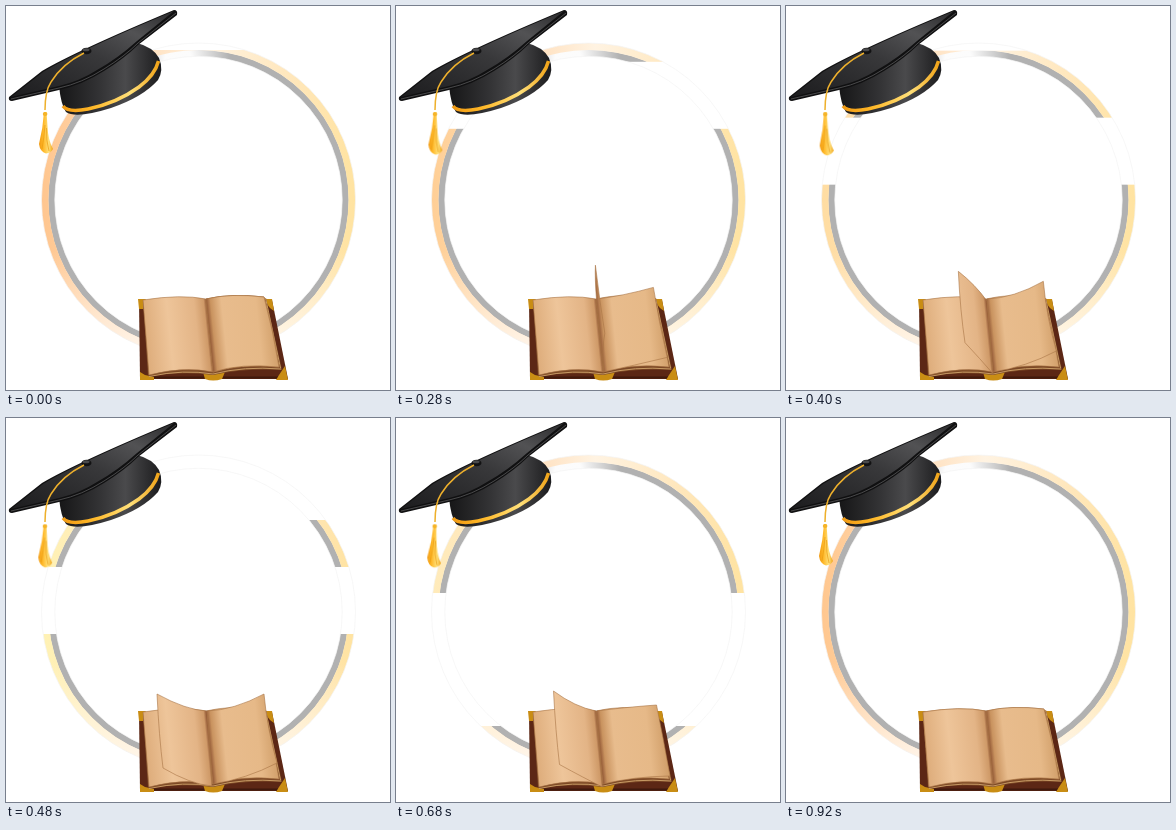
An HTML page that plays this animation: 384x384 px, repeating every 0.96 s.

```html
<!DOCTYPE html>
<html lang="en">
<head>
<meta charset="utf-8">
<title>Graduation ring</title>
<style>
html, body { margin: 0; width: 100%; height: 100%; overflow: hidden; background: #fff; }
svg { display: block; width: 100%; height: 100%; }

/* every segment is stepped at 40 ms */
.band-a, .band-b, .tassel, .leaf, .lift, .warm { animation: 960ms infinite; }
.band-a { animation-name: band-a; }
.band-b { animation-name: band-b; }
.tassel { animation-name: swing; transform-origin: 39px 100px; }
.leaf { animation-name: leaf; }
.lift { animation-name: lift; }
.warm { animation-name: warm; }

@keyframes band-a {
  0% { transform: translateY(-23px); animation-timing-function: steps(4); }
  16.667% { transform: translateY(0); animation-timing-function: steps(5); }
  37.5% { transform: translateY(93px); animation-timing-function: steps(3); }
  50% { transform: translateY(149px); animation-timing-function: steps(3); }
  62.5% { transform: translateY(204px); animation-timing-function: steps(4); }
  79.167% { transform: translateY(278px); animation-timing-function: steps(4); }
  95.833%, 100% { transform: translateY(352px); }
}
@keyframes band-b {
  0%, 16.667% { transform: translateY(-100px); animation-timing-function: steps(5); }
  37.5% { transform: translateY(-51px); animation-timing-function: steps(3); }
  50% { transform: translateY(35px); animation-timing-function: steps(3); }
  62.5% { transform: translateY(119px); animation-timing-function: steps(4); }
  79.167% { transform: translateY(231px); animation-timing-function: steps(4); }
  95.833%, 100% { transform: translateY(344px); }
}
@keyframes swing {
  0% { transform: rotate(0); animation-timing-function: steps(4); }
  16.667% { transform: rotate(5deg); animation-timing-function: steps(5); }
  37.5% { transform: rotate(-2deg) scaleY(1.04); animation-timing-function: steps(3); }
  50% { transform: rotate(1deg) scaleY(1.04); animation-timing-function: steps(3); }
  62.5% { transform: rotate(2.5deg) scaleY(1.04); animation-timing-function: steps(4); }
  79.167% { transform: rotate(2.5deg) scaleY(1.05); animation-timing-function: steps(4); }
  95.833%, 100% { transform: rotate(0); }
}
@keyframes leaf {
  0% { d: path("M200 293Q225 287 258 291Q267 324 273 361Q235 357 207 366Z"); animation-timing-function: steps(4); }
  16.667% { d: path("M200 293Q206 272 224 258Q232 290 237 323Q216 341 209 364Z"); animation-timing-function: steps(5); }
  37.5% { d: path("M201 296Q194 272 183 260Q185 300 190 330Q199 346 207 367Z"); animation-timing-function: steps(3); }
  50% { d: path("M201 293Q180 292 151 276Q153 318 157 350Q184 366 206 368Z"); animation-timing-function: steps(3); }
  62.5% { d: path("M201 293Q180 292 150 278Q152 318 157 350Q184 366 206 368Z"); animation-timing-function: steps(4); }
  79.167% { d: path("M199 293Q178 286 165 268Q167 308 170 343Q192 354 207 370Z"); animation-timing-function: steps(4); }
  95.833%, 100% { d: path("M200 293Q175 288 137 294Q140 330 143 369Q178 360 207 366Z"); }
}
@keyframes lift {
  0%, 16.667% { d: path("M200 293Q225 287 258 291Q267 324 273 361Q235 357 207 366Z"); animation-timing-function: steps(5); }
  37.5% { d: path("M201 293Q228 292 257 275Q260 310 270 345Q240 361 207 366Z"); animation-timing-function: steps(3); }
  50% { d: path("M201 293Q228 292 258 276Q261 310 271 345Q240 361 207 366Z"); animation-timing-function: steps(3); }
  62.5% { d: path("M201 293Q228 292 263 283Q268 318 275 355Q240 360 207 366Z"); animation-timing-function: steps(4); }
  79.167%, 100% { d: path("M200 293Q225 287 258 291Q267 324 273 361Q235 357 207 366Z"); }
}
@keyframes warm {
  0% { stop-color: #ffc68f; animation-timing-function: steps(4); }
  16.667% { stop-color: #ffca92; animation-timing-function: steps(5); }
  37.5% { stop-color: #ffd298; animation-timing-function: steps(3); }
  50% { stop-color: #fff2b4; animation-timing-function: steps(3); }
  62.5% { stop-color: #fffae0; animation-timing-function: steps(4); }
  79.167% { stop-color: #ffdc94; animation-timing-function: steps(4); }
  95.833%, 100% { stop-color: #ffc78f; }
}
</style>
</head>
<body>
<svg viewBox="0 0 384 384">
  <defs>
    <linearGradient id="peach" gradientUnits="userSpaceOnUse" x1="36" x2="350" y1="0" y2="0">
      <stop class="warm" offset="0" stop-color="#ffc68f"/>
      <stop offset=".36" stop-color="#ffe3c4"/>
      <stop offset=".52" stop-color="#fff3e2"/>
      <stop offset=".78" stop-color="#ffe7bd"/>
      <stop offset="1" stop-color="#ffe3a0"/>
    </linearGradient>
    <linearGradient id="fade" gradientUnits="userSpaceOnUse" x1="0" x2="0" y1="245" y2="350">
      <stop offset="0" stop-color="#fff" stop-opacity="0"/>
      <stop offset="1" stop-color="#fff" stop-opacity=".7"/>
    </linearGradient>
    <radialGradient id="glow">
      <stop offset=".25" stop-color="#fff" stop-opacity=".96"/>
      <stop offset="1" stop-color="#fff" stop-opacity="0"/>
    </radialGradient>
    <linearGradient id="board" x1="0" y1="1" x2="1" y2="0">
      <stop offset="0" stop-color="#1c1c1e"/>
      <stop offset=".5" stop-color="#38383a"/>
      <stop offset=".75" stop-color="#525254"/>
      <stop offset="1" stop-color="#2a2a2c"/>
    </linearGradient>
    <linearGradient id="skull">
      <stop offset="0" stop-color="#161617"/>
      <stop offset=".4" stop-color="#333335"/>
      <stop offset=".65" stop-color="#4a4a4c"/>
      <stop offset="1" stop-color="#1b1b1d"/>
    </linearGradient>
    <linearGradient id="gold">
      <stop offset="0" stop-color="#f09a14"/>
      <stop offset=".3" stop-color="#ffb726"/>
      <stop offset=".7" stop-color="#ffe07a"/>
      <stop offset="1" stop-color="#f0a41a"/>
    </linearGradient>
    <linearGradient id="paper" gradientUnits="userSpaceOnUse" x1="137" y1="335" x2="273" y2="321">
      <stop offset="0" stop-color="#dcaa78"/>
      <stop offset=".2" stop-color="#eec59a"/>
      <stop offset=".4" stop-color="#e3b486"/>
      <stop offset=".47" stop-color="#cf9a68"/>
      <stop offset=".49" stop-color="#965c38"/>
      <stop offset=".52" stop-color="#c9935f"/>
      <stop offset=".6" stop-color="#e8bc8d"/>
      <stop offset=".85" stop-color="#e6b988"/>
      <stop offset="1" stop-color="#cd9a64"/>
    </linearGradient>
  </defs>

  <rect width="384" height="384" fill="#fff"/>

  <!-- ring -->
  <circle cx="192.500" cy="194" r="147" fill="none" stroke="#b1b1b1" stroke-width="6.500"/>
  <circle cx="172" cy="52" r="52" fill="url(#glow)"/>
  <g fill="none" stroke-width="7">
    <circle cx="192.500" cy="194" r="153.500" stroke="url(#peach)"/>
    <circle cx="192.500" cy="194" r="153.500" stroke="url(#fade)"/>
  </g>
  <rect class="band-a" x="30" width="325" height="67" fill="#fff"/>
  <rect class="band-b" x="30" width="325" height="67" fill="#fff"/>
  <g fill="none" stroke="#f4f4f4" stroke-width=".7">
    <circle cx="192.500" cy="194" r="157"/>
    <circle cx="192.500" cy="194" r="143.700"/>
  </g>

  <!-- cap -->
  <path d="M53 80Q55 99 60 106Q70 113 105 102Q137 91 152 74Q158 64 153 52Q147 41 131 37Z" fill="url(#skull)"/>
  <path d="M57 100Q62 107 82 103Q111 97 133 81Q149 69 152.500 55" fill="none" stroke="url(#gold)" stroke-width="3.500"/>
  <path d="M3 91Q2 95 6 95L53 84Q76 79 98 65Q119 52 132 39L171 9Q172 4 168 4Q70 45 36 65Z" fill="#101011"/>
  <path d="M5 91L37 66Q70 46 168 5L131 35Q111 53 91 64Q74 75 53 80Z" fill="url(#board)"/>
  <path d="M5 93L53 82Q76 77 98 63Q119 50 132 37L170 7" fill="none" stroke="#58585a" stroke-width=".8"/>
  <ellipse cx="80.500" cy="45" rx="5" ry="3.200" fill="#121213"/>
  <ellipse cx="80" cy="43.800" rx="3.500" ry="1.500" fill="#49494b"/>
  <path d="M78 47Q56 58 45 76Q39 85 39 104" fill="none" stroke="#eeb02c" stroke-width="1.500"/>
  <g class="tassel">
    <path d="M38 106Q37 122 33 138Q34 146 40 147.500Q45 147 47 143Q42 134 41.500 120L40.500 106Z" fill="url(#gold)"/>
    <path d="M39 119Q38 132 36 143M40.500 122Q40 135 43 145" fill="none" stroke="#e89c14" stroke-width=".7"/>
    <rect x="36.800" y="106" width="4.600" height="4" rx="2" fill="#f5b428"/>
  </g>

  <!-- book -->
  <path d="M133 294H266L282 373H134Z" fill="#5c2715"/>
  <path d="M134 371.500H281" stroke="#3f190d" stroke-width="2"/>
  <g fill="#c98d14">
    <path d="M132 293H140L138 297L137 303H133Z"/>
    <path d="M257 293H266L268 305L264 302Z"/>
    <path d="M134 366L139 369L148 371V374H134Z"/>
    <path d="M279 360L282 374H270L273 369Z"/>
    <path d="M197 366Q207 361 219 366L216 373Q207 376 199 373Z"/>
  </g>
  <path d="M137 295L142 370Q180 365 207 369Q240 362 276 364L260 292Z" fill="#7c4825"/>
  <path d="M143 370.500Q178 363 207 368Q238 360 275 363M259.500 292L274.500 362" fill="none" stroke="#c79a64"/>
  <g fill="url(#paper)" stroke="#a87446" stroke-width=".6" stroke-linejoin="round">
    <path d="M200 293Q175 288 137 294Q140 330 143 369Q178 360 207 366Z"/>
    <path d="M200 293Q225 287 258 291Q267 324 273 361Q235 357 207 366Z"/>
    <path class="lift" d="M200 293Q225 287 258 291Q267 324 273 361Q235 357 207 366Z"/>
    <path class="leaf" d="M200 293Q225 287 258 291Q267 324 273 361Q235 357 207 366Z"/>
  </g>
</svg>
</body>
</html>
```
